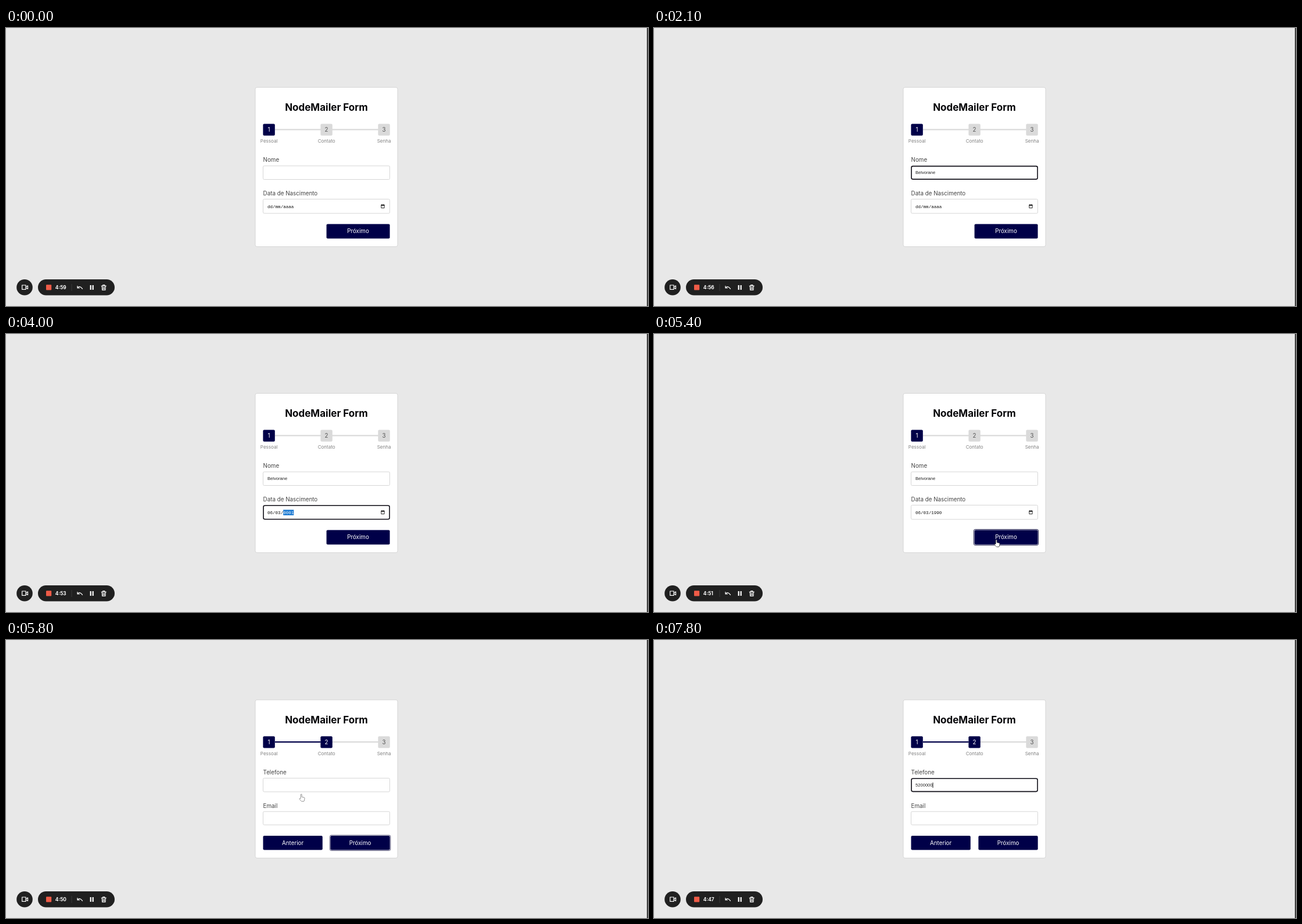
Animation, 1105 px wide and 480 px high, one loop 8000 ms. Source, as an HTML page:

```html
<!DOCTYPE html>
<html lang="pt">
<head>
<meta charset="utf-8">
<title>NodeMailer Form</title>
<style>
  html, body { margin: 0; width: 100%; height: 100%; overflow: hidden; background: #e8e8e8; }
  svg { display: block; width: 100vw; height: 100vh; }
  text { font: 9.8px Inter, sans-serif; fill: #444; white-space: pre; }
  .mid { text-anchor: middle; }
  .title { font-size: 17px; font-weight: 700; fill: #050508; }
  .tag { font-size: 8px; fill: #808080; }
  .on, .btn { fill: #000048; }
  .off { fill: #dadada; }
  .light { fill: #fff; }
  .box { fill: #fff; stroke: #d6d6d6; }
  .focus { fill: none; stroke: #15131c; stroke-width: 1.6; }
  .typed { font: 7.6px "Liberation Sans", Arial, sans-serif; fill: #222; }
  .date { font: 7.55px "Liberation Mono", monospace; fill: #111; }
  .icon { fill: none; stroke: #fff; stroke-width: 1.2; stroke-linejoin: round; stroke-linecap: round; }
  .ring { fill: #fff; stroke: #24224f; stroke-width: 1; }
</style>
</head>
<body>
<svg viewBox="0 0 1105 480">
  <rect width="1105" height="480" fill="#e8e8e8"/>
  <rect x="1103.2" width="1.6" height="480" fill="#161616"/>
  <rect id="card" x="429" width="245" rx="3" class="box"/>

  <g id="head">
    <text class="title mid" x="551.5" y="143.4">NodeMailer Form</text>
    <rect class="off" x="463" y="174.3" width="178" height="2.2"/>
    <rect class="on" id="bar" x="463" y="174.3" height="2.2"/>
    <g id="steps"></g>
  </g>

  <g id="personal">
    <text x="442.6" y="231.4">Nome</text>
    <rect class="box" x="442.5" y="238" width="218" height="23.5" rx="2"/>
    <text x="442.6" y="288.9">Data de Nascimento</text>
    <rect class="box" x="442.5" y="295.5" width="218" height="24.5" rx="2"/>
    <text class="typed" id="name" x="450" y="252.4"></text>
    <rect id="mark" y="303.5" height="9.5" fill="#1878d2"/>
    <text class="date" x="450" y="310.6" id="date"><tspan></tspan><tspan fill="#fff"></tspan><tspan></tspan></text>
    <path d="M645.9 305.8h5.2v5h-5.2zM647 304v1.5M650 304v1.5" fill="none" stroke="#111" stroke-width=".9"/>
    <path d="M645.5 306h6" stroke="#111" stroke-width="1.5"/>
    <rect class="ring" id="ring1" x="550.4" y="337.4" width="111.2" height="27.2" rx="2.5"/>
    <rect class="btn" x="551.6" y="338.5" width="109" height="25" rx="2"/>
    <text class="light mid" x="606" y="354.3">Próximo</text>
  </g>

  <g id="contact">
    <text x="442.6" y="232">Telefone</text>
    <rect class="box" x="442.5" y="238.6" width="218" height="23.5" rx="2"/>
    <text x="442.6" y="289.5">Email</text>
    <rect class="box" x="442.5" y="296.2" width="218" height="23" rx="2"/>
    <text class="typed" id="phone" x="450" y="253"></text>
    <rect class="btn" x="442.5" y="338" width="102.3" height="24.6" rx="2"/>
    <text class="light mid" x="493.6" y="353.9">Anterior</text>
    <rect class="ring" id="ring2" x="557.4" y="337" width="104.4" height="26.6" rx="2.5" stroke-opacity=".75"/>
    <rect class="btn" x="558.4" y="338" width="102.3" height="24.6" rx="2"/>
    <text class="light mid" x="609.6" y="353.9">Próximo</text>
  </g>

  <rect class="focus" id="focus" x="443.1" width="217" rx="2.5"/>
  <rect id="caret" width="1" height="9" fill="#111"/>

  <circle cx="32" cy="447.8" r="13.8" fill="#202020"/>
  <rect x="55" y="434" width="132" height="27.6" rx="13.8" fill="#202020"/>
  <path class="icon" d="M27.7 444h6.4v7.4h-6.4zM34.5 447l3-2v5.600l-3-2"/>
  <rect x="69" y="443.2" width="9.2" height="9.400" rx="1" fill="#ef5b47"/>
  <text id="clock" x="84.800" y="450.900" style="font-size:8.300px;font-weight:700;fill:#fff"></text>
  <path d="M113 442v12" stroke="#383838"/>
  <path class="icon" d="M123 445.500v3.500h3.500M123.300 448.600q4-4.500 8.200 1.800"/>
  <path class="icon" style="stroke-width:2.200;stroke-linecap:butt" d="M145.700 444v8M149.700 444v8"/>
  <path class="icon" d="M164.300 445.300h8M166.800 445v-1.500h3v1.500M165.300 445.600l.4 6.800h5.200l.4-6.800M167.300 447.500v3M169.300 447.500v3"/>

  <g id="cursor" stroke="#333" stroke-width=".8" fill="#fff" stroke-linejoin="round">
    <path id="hand" d="M2.200 7.500V1.200a1 1 0 0 1 2 0V5l4 .9q1 .3 .9 1.300l-.6 3.800q-.2 1.600-1.500 1.600H4.200q-.9 0-1.500-.9L.2 8.700q-.4-1.200 .7-1.300z"/>
    <path id="arrow" fill="#111" stroke="#fff" d="M2 0v11l2.500-2.300 1.700 3.800 1.700-.8-1.700-3.600h3.300z"/>
  </g>
</svg>

<script>
const LOOP = 8000, FRAME = 100, BLINK = 340;
const SWITCH = 5500, CLICK = 5300;
const NAME = 'Belvorane', PHONE = '5200000';

const nameKeys = [800, 900, 1000, 1100, 1300, 1400, 1500, 1600, 1700];
const phoneKeys = [6700, 6900, 7100, 7200, 7400, 7600, 7800];

// time, value, selected from, to
const dates = [
  [0, 'dd/mm/aaaa', 0, 0],
  [2500, 'dd/mm/aaaa', 0, 2],
  [3100, '00/mm/aaaa', 0, 2],
  [3300, '06/mm/aaaa', 3, 5],
  [3500, '06/00/aaaa', 3, 5],
  [3800, '06/03/aaaa', 6, 10],
  [4000, '06/03/0001', 6, 10],
  [4200, '06/03/0019', 6, 10],
  [4300, '06/03/0199', 6, 10],
  [4500, '06/03/1990', 6, 10],
  [CLICK, '06/03/1990', 0, 0]
];
const focuses = [[0, ''], [100, 'name'], [2500, 'date'], [CLICK, 'next'], [6200, 'phone']];
const frames = { name: [238.6, 22.5], date: [296.2, 23.5], phone: [239.2, 22.4] };
const moves = [[5000, 506, 264], [5100, 530, 304], [5200, 570, 344], [5300, 585, 354],
  [5400, 586, 355], [5600, 586, 355], [5700, 556, 322], [5800, 505, 266]];

const $ = id => document.getElementById(id);
const show = (id, on) => $(id).style.display = on ? '' : 'none';
const set = (id, attrs) => { for (const k in attrs) $(id).setAttribute(k, attrs[k]); };
const at = (table, t) => table.filter(row => row[0] <= t).pop();
const ease = p => p * p * (3 - 2 * p);
const clamp = p => Math.min(1, Math.max(0, p));

$('steps').innerHTML = ['Pessoal', 'Contato', 'Senha'].map((label, i) => {
  const x = 452.6 + i * 99;
  return `<rect x="${x - 10.2}" y="165.5" width="20.4" height="20.2" rx="2"/>
    <text class="mid" x="${x}" y="179.1">${i + 1}</text>
    <text class="mid tag" x="${x}" y="198">${label}</text>`;
}).join('');
const boxes = $('steps').querySelectorAll('rect');
const digits = $('steps').querySelectorAll('.mid:not(.tag)');

function drawSteps(t) {
  const second = t >= SWITCH;
  set('head', { transform: `translate(0 ${second ? 0.7 : 0})` });
  set('card', second ? { y: 103.3, height: 273.2 } : { y: 102.5, height: 275 });
  set('bar', { width: 78.5 * ease(clamp((t - SWITCH) / 300)) });
  const active = t >= SWITCH + 100 ? 1 : 0;
  boxes.forEach((box, i) => {
    box.setAttribute('class', i <= active ? 'on' : 'off');
    digits[i].style.fill = i <= active ? '#fff' : '#555';
  });
  show('personal', !second);
  show('contact', second);
}

function drawDate(t) {
  const [, value, from, to] = at(dates, t);
  const parts = [value.slice(0, from), value.slice(from, to), value.slice(to)];
  $('date').querySelectorAll('tspan').forEach((span, i) => span.textContent = parts[i]);
  const char = $('date').getComputedTextLength() / value.length;
  set('mark', { x: 450 + from * char, width: (to - from) * char });
}

function drawField(id, value, keys, t, start, active) {
  const hits = keys.filter(k => k <= t);
  $(id).textContent = value.slice(0, hits.length);
  if (!active) return;
  const last = hits.length ? hits[hits.length - 1] : start;
  const lit = Math.floor((t - last) / BLINK) % 2 === 0;
  const width = hits.length ? $(id).getComputedTextLength() : 0;
  show('caret', lit);
  set('caret', { x: 449.9 + width, y: frames[id][0] + 7 });
}

function drawCursor(t) {
  const visible = t >= 5000 && t <= 5800;
  show('cursor', visible);
  if (!visible) return;
  const a = at(moves, t), b = moves.find(m => m[0] > t) || a;
  const p = a === b ? 0 : (t - a[0]) / (b[0] - a[0]);
  const [x, y] = [1, 2].map(i => a[i] + (b[i] - a[i]) * p);
  set('cursor', { transform: `translate(${x} ${y})`, opacity: t < 5800 ? 1 : 0.65 });
  show('hand', t >= 5200);
  show('arrow', t < 5200);
}

function render(now) {
  const t = Math.floor(now % LOOP / FRAME) * FRAME;
  const [start, field] = at(focuses, t);
  drawSteps(t);
  drawDate(t);
  show('caret', false);
  drawField('name', NAME, nameKeys, t, start, field === 'name');
  drawField('phone', PHONE, phoneKeys, t, start, field === 'phone');
  show('focus', field in frames);
  if (field in frames) set('focus', { y: frames[field][0], height: frames[field][1] });
  show('ring1', field === 'next');
  show('ring2', field === 'next');
  drawCursor(t);
  $('clock').textContent = '4:' + (58 - Math.floor((t - 315) / 675));
}

const begin = performance.now();
function tick() {
  render(performance.now() - begin);
  requestAnimationFrame(tick);
}
tick();
</script>
</body>
</html>
```
